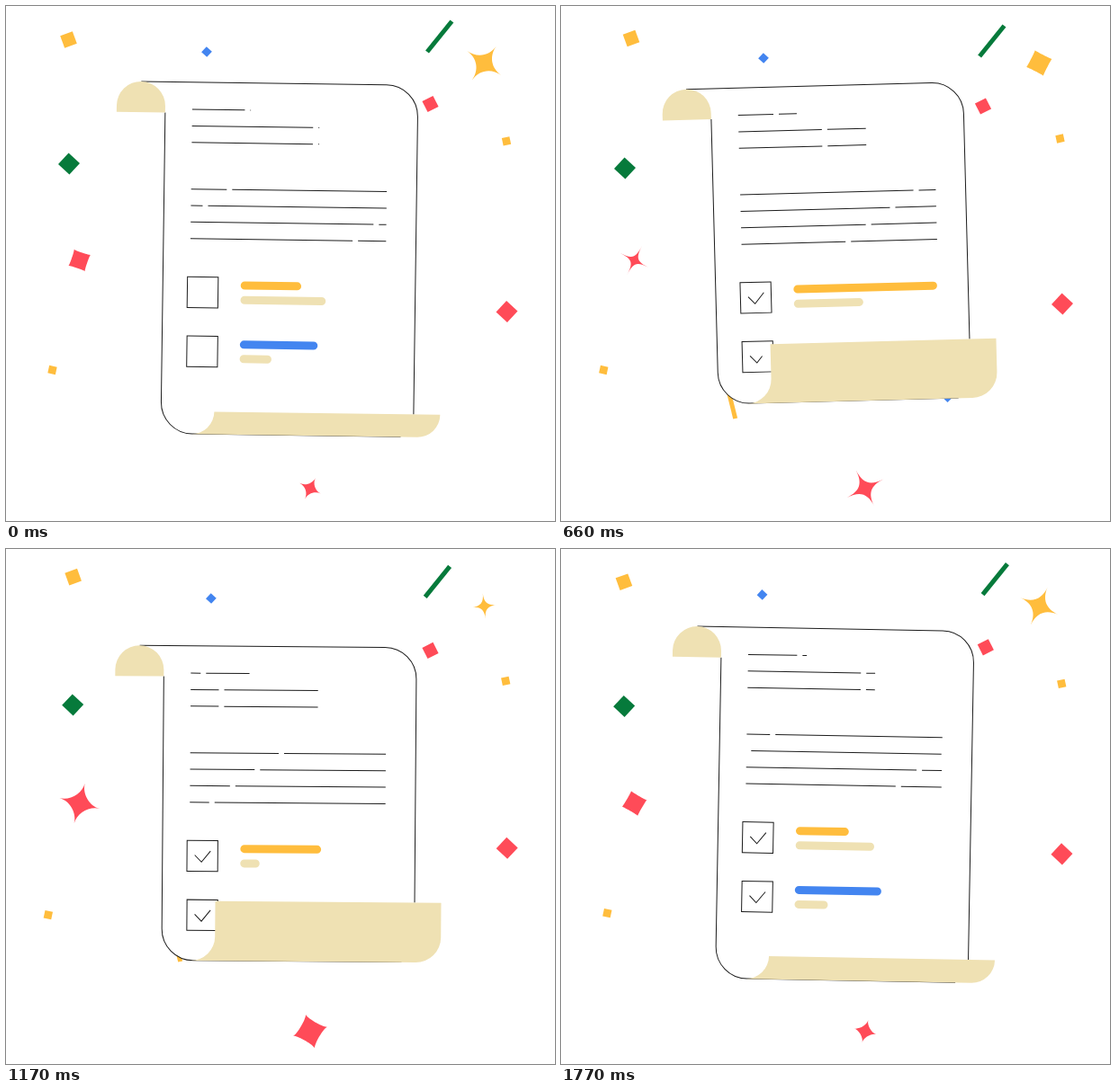
An HTML page with a canvas that plays this animation: 610 px wide and 573 px high, repeating every 1.8 s.

```html
<!DOCTYPE html>
<html lang="en">
<head>
<meta charset="utf-8">
<title>Checklist scroll</title>
<style>
  html, body { margin: 0; width: 100%; height: 100%; overflow: hidden; background: #fff; }
  canvas { display: block; }
</style>
</head>
<body>
<canvas id="stage" width="610" height="573"></canvas>
<script>
const ctx = document.getElementById('stage').getContext('2d');
const LOOP = 1800, STEP = 30, TAU = Math.PI * 2;
const YELLOW = '#ffbd3d', GREEN = '#067a3b', RED = '#ff4b58', BLUE = '#4385f0';
const SAND = '#efe1b3', INK = '#1c1c1c';

// Paper geometry before swaying
const LEFT = 173.4, RIGHT = 454, TOP = 94.7, RADIUS = 35;
const PIVOT = { x: 313, y: 380 };

const wave = (t, peak) => Math.cos(TAU * (t - peak) / LOOP);
const swing = (t, mid, amp, peak) => mid + amp * wave(t, peak);

function smooth(x) {
  x = Math.min(1, Math.max(0, x));
  return x * x * (3 - 2 * x);
}

// Closed spline through values at the shared knot times
const KNOTS = [27, 300, 660, 1020, 1350, 1530];

function drift(values, t) {
  const n = KNOTS.length;
  const time = i => KNOTS[(i + n) % n] + LOOP * Math.floor(i / n);
  const val = i => values[(i + n) % n];
  const slope = i => (val(i + 1) - val(i - 1)) / (time(i + 1) - time(i - 1));
  if (t < KNOTS[0]) t += LOOP;
  let i = n - 1;
  while (t < time(i)) i--;
  const h = time(i + 1) - time(i), s = (t - time(i)) / h;
  const s2 = s * s, s3 = s2 * s;
  return val(i) * (2 * s3 - 3 * s2 + 1) + val(i + 1) * (3 * s2 - 2 * s3) +
    h * (slope(i) * (s3 - 2 * s2 + s) + slope(i + 1) * (s3 - s2));
}

const squares = [
  { color: YELLOW, side: 14.5, turn: -20, x: [69.5, 74.5, 78, 74, 76, 75], y: [37.5, 37.5, 36, 32.5, 30, 31.5] },
  { color: BLUE, side: 8.3, turn: 43, x: [223, 223, 225, 227, 228.5, 227], y: [51, 54, 58, 56.5, 53, 52] },
  { color: RED, side: 13.5, turn: -27, x: [471.5, 470, 469, 471, 472, 473], y: [109, 108.5, 111.5, 113.3, 112, 111] },
  { color: YELLOW, side: 8.7, turn: -12, x: [556, 555.7, 554.5, 554, 557, 557.5], y: [150.3, 149.5, 147.5, 147, 147, 147.2] },
  { color: GREEN, side: 17, turn: 43, x: [70, 70.5, 71, 74.5, 73, 71.5], y: [175.5, 180.7, 180.5, 174.5, 173, 173.7] },
  { color: RED, side: 17, turn: 43, x: [556.5, 555, 557, 557.5, 555.5, 555.5], y: [340, 338.7, 331.5, 332, 334, 335] },
  { color: YELLOW, side: 8.7, turn: 12, x: [51.5, 49, 47.3, 47, 47, 49], y: [405, 407, 405, 406.3, 408, 406.5] }
];

const stick = { x: [481.7, 475.2, 478.8, 479.6, 479.5, 482.3], y: [34, 38, 39, 38.2, 34, 33] };

const stars = [
  { color: YELLOW, x: 531.3, y: 63.5, turn: 30, spin: 0.2, peak: 30 },
  { color: RED, x: 81.7, y: 283, turn: 69, spin: -0.2, peak: 1095 },
  { color: RED, x: 338, y: 536.7, turn: 21, spin: 0.2, peak: 805 }
];

// Ruled lines: y, width, time at which the gap enters
const rules = [
  [125, 65.2, 119], [143.4, 141.5, 71], [161.8, 141.5, 71],
  [213.6, 217.4, -137], [232, 217.4, -27], [250.3, 217.4, 86], [268.7, 217.4, 181]
];

// Bars: colour, y, middle of right end, amplitude, peak time
const bars = [
  [YELLOW, 320.2, 361.7, 57.8, 660],
  [SAND, 336.4, 326.2, 44.8, 280],
  [BLUE, 386, 367, 51.2, 1258],
  [SAND, 402, 333, 38, 960]
];

// Boxes: centre and time at which the tick starts
const boxes = [[217.8, 328.4, 210], [218.2, 394.2, 435]];

function line(x1, y1, x2, y2) {
  ctx.beginPath();
  ctx.moveTo(x1, y1);
  ctx.lineTo(x2, y2);
  ctx.stroke();
}

function pen(color, width, cap = 'butt') {
  ctx.strokeStyle = color;
  ctx.lineWidth = width;
  ctx.lineCap = cap;
}

function square(color, side, turn, x, y) {
  ctx.save();
  ctx.translate(x, y);
  ctx.rotate(turn * Math.PI / 180);
  ctx.fillStyle = color;
  ctx.fillRect(-side / 2, -side / 2, side, side);
  ctx.restore();
}

function star(s, t) {
  const tip = swing(t, 18, 5.3, s.peak);
  const waist = swing(t, 8, 3.6, s.peak + 355);
  const k = Math.min(1, Math.max(0, (waist / tip * 8 / Math.SQRT2 - 1) / 3)) * tip;
  ctx.save();
  ctx.translate(s.x, s.y);
  ctx.rotate((s.turn + s.spin * t) * Math.PI / 180);
  ctx.fillStyle = s.color;
  ctx.beginPath();
  ctx.moveTo(tip, 0);
  ctx.bezierCurveTo(k, 0, 0, k, 0, tip);
  ctx.bezierCurveTo(0, k, -k, 0, -tip, 0);
  ctx.bezierCurveTo(-k, 0, 0, -k, 0, -tip);
  ctx.bezierCurveTo(0, -k, k, 0, tip, 0);
  ctx.fill();
  ctx.restore();
}

function confetti(t) {
  for (const s of squares) square(s.color, s.side, s.turn, drift(s.x, t), drift(s.y, t));
  pen(GREEN, 5);
  const x = drift(stick.x, t), y = drift(stick.y, t);
  line(x - 13.7, y + 17, x + 13.7, y - 17);
  pen(YELLOW, 5);
  line(184.5, 422, 193.7, 459);
  square(BLUE, 9, 45, 429.5, 434.7);
  for (const s of stars) star(s, t);
}

function sheet(bottom, fold) {
  ctx.fillStyle = '#fff';
  ctx.beginPath();
  ctx.roundRect(LEFT, TOP, RIGHT - LEFT, bottom - TOP, [0, RADIUS, 0, RADIUS]);
  ctx.fill();

  pen(INK, 1);
  ctx.beginPath();
  ctx.moveTo(146.4, TOP);
  ctx.lineTo(RIGHT - RADIUS, TOP);
  ctx.arc(RIGHT - RADIUS, TOP + RADIUS, RADIUS, -TAU / 4, 0);
  ctx.lineTo(RIGHT, fold);
  ctx.moveTo(LEFT, 128.8);
  ctx.lineTo(LEFT, bottom - RADIUS);
  ctx.arc(LEFT + RADIUS, bottom - RADIUS, RADIUS, TAU / 2, TAU / 4, true);
  ctx.lineTo(440, bottom);
  ctx.stroke();
}

function topCurl() {
  ctx.fillStyle = SAND;
  ctx.beginPath();
  ctx.moveTo(119.4, 128.8);
  ctx.lineTo(119.4, TOP + 27);
  ctx.arc(146.4, TOP + 27, 27, TAU / 2, TAU);
  ctx.lineTo(173.4, 128.8);
  ctx.fill();
}

function bottomCurl(bottom, fold) {
  const x1 = 232.5, x2 = 483.5, base = bottom + 0.3;
  const ra = Math.min(27, base - fold), rb = Math.min(28, base - fold);
  ctx.fillStyle = SAND;
  ctx.beginPath();
  ctx.moveTo(x1, fold);
  ctx.lineTo(x2, fold);
  ctx.arc(x2 - rb, base - rb, rb, 0, TAU / 4);
  ctx.lineTo(x1 - ra, base);
  ctx.arc(x1 - ra, base - ra, ra, TAU / 4, 0, true);
  ctx.fill();
}

function tick(x, y, part) {
  if (part <= 0) return;
  ctx.setLineDash([26.7 * part, 60]);
  ctx.beginPath();
  ctx.moveTo(x - 8.5, y - 1);
  ctx.lineTo(x - 1, y + 6.8);
  ctx.lineTo(x + 9, y - 5.5);
  ctx.stroke();
  ctx.setLineDash([]);
}

function content(t, clock) {
  pen(INK, 1);
  for (const [y, width, start] of rules) {
    const gap = ((t - start) / 900 + 1) % 1 * width;
    ctx.setLineDash([width - 6, 6]);
    ctx.lineDashOffset = width - 6 - gap;
    line(203.4, y, 203.4 + width, y);
  }
  ctx.setLineDash([]);
  ctx.lineDashOffset = 0;

  for (const [x, y, start] of boxes) {
    ctx.strokeRect(x - 17.1, y - 17.1, 34.2, 34.2);
    tick(x, y, smooth((clock - start) / 330));
  }

  for (const [color, y, mid, amp, peak] of bars) {
    pen(color, 9, 'round');
    line(264.4, y, swing(t, mid, amp, peak) - 4.5, y);
  }
}

function draw(clock) {
  // The sway starts slightly ahead and settles into the clock
  const t = clock + Math.max(0, 27 - clock * 0.09);
  ctx.fillStyle = '#fff';
  ctx.fillRect(0, 0, 610, 573);
  confetti(t);

  const bob = 14 * (1.06 * wave(t, 1222) - 0.06 * Math.cos(3 * TAU * (t - 1222) / LOOP));
  const roll = swing(t, 50, 25, 923);
  const bottom = 511 - roll, fold = bottom - roll;

  ctx.save();
  ctx.translate(PIVOT.x, PIVOT.y + bob);
  ctx.rotate(swing(t, 0, 1.5, 1535) * Math.PI / 180);
  ctx.translate(-PIVOT.x, -PIVOT.y);
  sheet(bottom, fold);
  topCurl();
  content(t, clock);
  bottomCurl(bottom, fold);
  ctx.restore();
}

const begin = performance.now();

function frame() {
  const clock = (performance.now() - begin) % LOOP;
  draw(Math.floor(clock / STEP) * STEP);
  requestAnimationFrame(frame);
}
frame();
</script>
</body>
</html>
```
